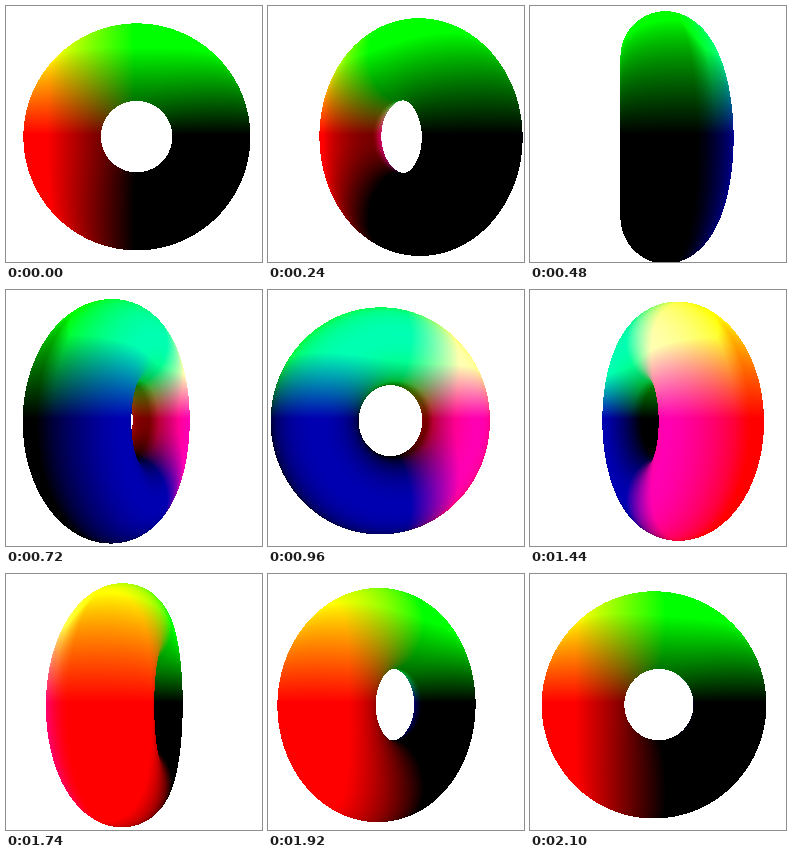
Animation of 256x256 px, one loop 2.16 s. Source, as an HTML page with a canvas:

```html
<!DOCTYPE html>
<html lang="en">
<head>
<meta charset="utf-8">
<title>Turning torus</title>
<style>
  html, body { margin: 0; width: 100%; height: 100%; overflow: hidden; background: #fff; }
  canvas { display: block; width: 100vw; height: 100vh; }
</style>
</head>
<body>
<canvas id="stage" width="256" height="256"></canvas>
<script>
const SIZE = 256;
const STEPS = 36;
const STEP_MS = 60;
const FOCAL = 216;
const CAMERA = 3;
const MAJOR = 1;
const MINOR = 0.5;
const CENTER = { x: 0.03, y: -0.03, z: 0.02 }; // slightly off the turning axis
const BACK_GAIN = 0.45;
const GAIN_DEPTH = 0.15;

const ctx = document.getElementById('stage').getContext('2d');

function torusDistance(x, y, z) {
  x -= CENTER.x;
  y -= CENTER.y;
  z -= CENTER.z;
  const ring = Math.sqrt(x * x + y * y) - MAJOR;
  return Math.sqrt(ring * ring + z * z) - MINOR;
}

// Walks a ray to the surface; returns the hit distance or -1.
function trace(ox, oz, dx, dy, dz) {
  let t = 1.3;
  for (let i = 0; i < 400 && t < 5; i++) {
    const d = torusDistance(ox + dx * t, dy * t, oz + dz * t);
    if (d < 0.0008) return t;
    t += d;
  }
  return -1;
}

function render(step) {
  const angle = step / STEPS * 2 * Math.PI;
  const c = Math.cos(angle), s = Math.sin(angle);
  const image = ctx.createImageData(SIZE, SIZE);
  const px = image.data.fill(255);
  const ox = CAMERA * s, oz = CAMERA * c;

  for (let row = 0; row < SIZE; row++) {
    for (let col = 0; col < SIZE; col++) {
      const u = (col - SIZE / 2) / FOCAL;
      const v = (SIZE / 2 - row) / FOCAL;
      const len = Math.sqrt(u * u + v * v + 1);
      const dx = (u * c - s) / len;
      const dy = v / len;
      const dz = (-u * s - c) / len;
      const t = trace(ox, oz, dx, dy, dz);
      if (t < 0) continue;

      // Colour follows the position on the body, brighter on its back half;
      // the byte array clamps it.
      const z = oz + dz * t;
      const back = Math.min(1, Math.max(0, -z / GAIN_DEPTH));
      const gain = 255 * (1 + BACK_GAIN * back);
      const k = (row * SIZE + col) * 4;
      px[k] = -gain * (ox + dx * t);
      px[k + 1] = gain * dy * t;
      px[k + 2] = -gain * z;
    }
  }
  return image;
}

const frames = Array.from({ length: STEPS }, (_, step) => render(step));

let start;
function tick(now) {
  if (start === undefined) start = now;
  const step = Math.floor((now - start) / STEP_MS) % STEPS;
  ctx.putImageData(frames[step], 0, 0);
  requestAnimationFrame(tick);
}
ctx.putImageData(frames[0], 0, 0);
requestAnimationFrame(tick);
</script>
</body>
</html>
```
